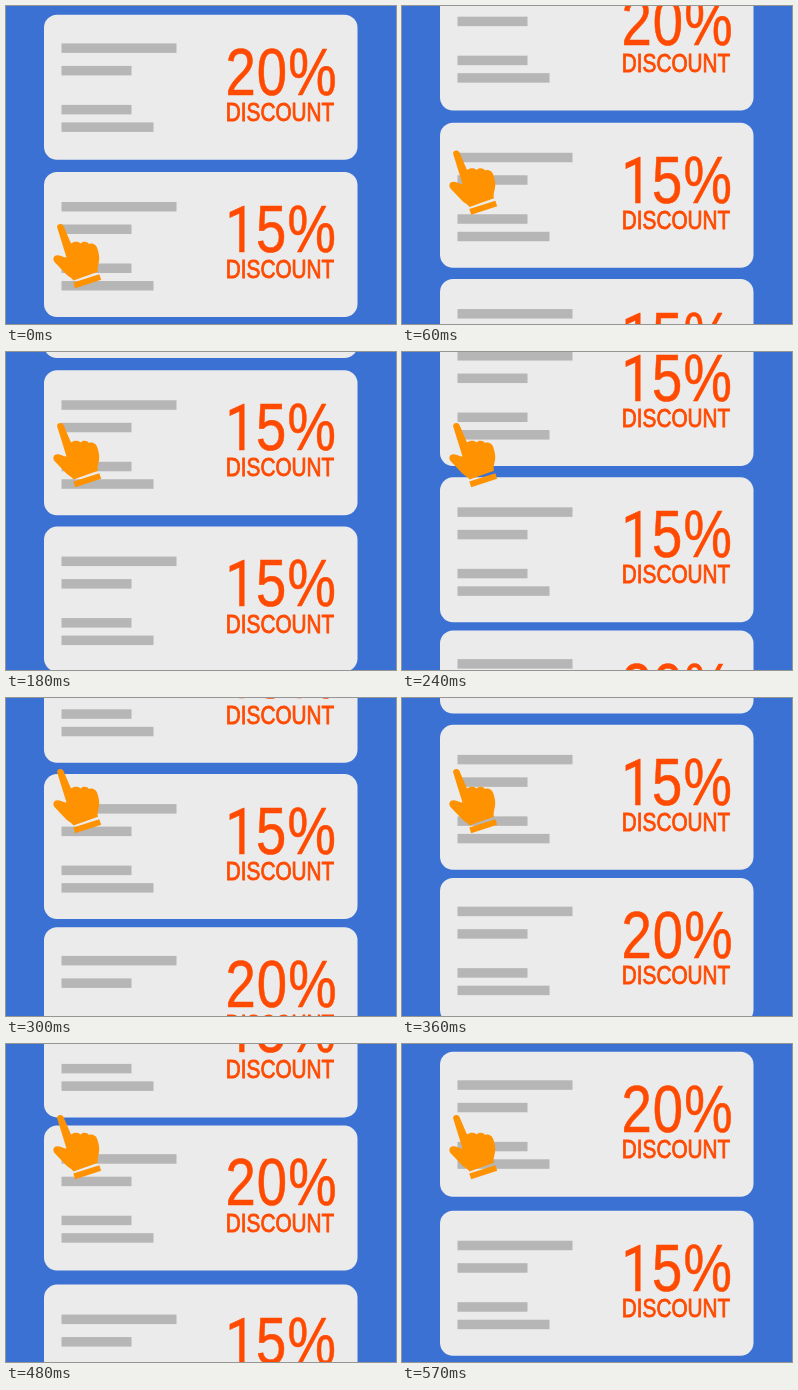
Recreate the animation shown at these times as an HTML page. Size 390 px wide and 318 px high, loop 1.17 s.

```html
<!DOCTYPE html>
<html lang="en">
<head>
<meta charset="utf-8">
<title>Discount cards</title>
<style>
  html, body { margin: 0; width: 100%; height: 100%; overflow: hidden; background: #3c71d4; }
  svg { display: block; }
  text { font-family: "Liberation Sans", Arial, sans-serif; fill: #ff4a00; stroke: #ff4a00; }
  .rate { font-size: 66.4px; letter-spacing: 1.3px; stroke-width: .6; }
  .plain-one { font: 64px Roboto, sans-serif; }
  .label { font-size: 26.3px; stroke-width: .9; }
</style>
</head>
<body>
<svg width="390" height="318" viewBox="0 0 390 318">
  <g id="cards"></g>
  <g id="hand" fill="#ff9200">
    <path d="M51.2 3.5C50.3 0 55.6 -1.6 57.5 2L65 19.5C68 17 72.5 17 74.5 19.5C77 16.8 81.5 17.5 83 20
      C87 18.5 90.5 21 91.5 25C93.8 32 93.6 36 92.4 40C91.4 44 91.5 46 92 47.8L67.5 56.4C65 53 61 52 58 48
      L48.5 38C46 34.5 48 30.8 52 31.2C55.5 31.5 57.5 33.5 60.5 33.5Z"/>
    <path d="M67.3 58.5L93.3 50.2L95.2 55.8L69.2 64.2Z"/>
  </g>
</svg>
<script>
  const STEP_MS = 30, LAST_STEP = 19, LOOP_MS = 1170;
  const CARD_SPEED = 24.62, HAND_SPEED = 36.75, HAND_STEPS = 4, HAND_TOP = 218;

  // [discount, top edge at the start]
  const cards = [[20, 8.8], [15, 166], [15, 322.3], [20, 475.5], [15, 634.5]];
  // [offset, width]
  const lines = [[30, 115], [52.5, 70], [91.5, 70], [109, 92]];

  const bar = ([y, width]) =>
    `<rect x="55.5" y="${y}" width="${width}" height="9.5" fill="#b6b6b6"/>`;

  const condensed = (type, x, y, scale, content) =>
    `<text class="${type}" transform="translate(${x} ${y}) scale(${scale} 1)">${content}</text>`;

  const card = ([rate, top]) => {
    const digits = String(rate).replace('1', '<tspan class="plain-one">1</tspan>');
    return `<g transform="translate(0 ${top})">
      <rect x="38" width="313.5" height="145" rx="13" fill="#ebebeb"/>
      <g transform="translate(0 ${rate === 20 ? -1.4 : 0})">${lines.map(bar).join('')}</g>
      ${condensed('rate', 219.5, 79.8, .82, digits + '%')}
      ${condensed('label', 219.8, 106, .79, 'DISCOUNT')}
    </g>`;
  };

  const list = document.getElementById('cards');
  const hand = document.getElementById('hand');
  list.innerHTML = cards.map(card).join('');

  const moveTo = (node, y) => node.setAttribute('transform', `translate(0 ${y})`);

  function draw() {
    const step = Math.min(LAST_STEP, Math.floor(performance.now() % LOOP_MS / STEP_MS));
    moveTo(list, -CARD_SPEED * step);
    moveTo(hand, HAND_TOP - HAND_SPEED * Math.min(step, HAND_STEPS));
    requestAnimationFrame(draw);
  }
  draw();
</script>
</body>
</html>
```
